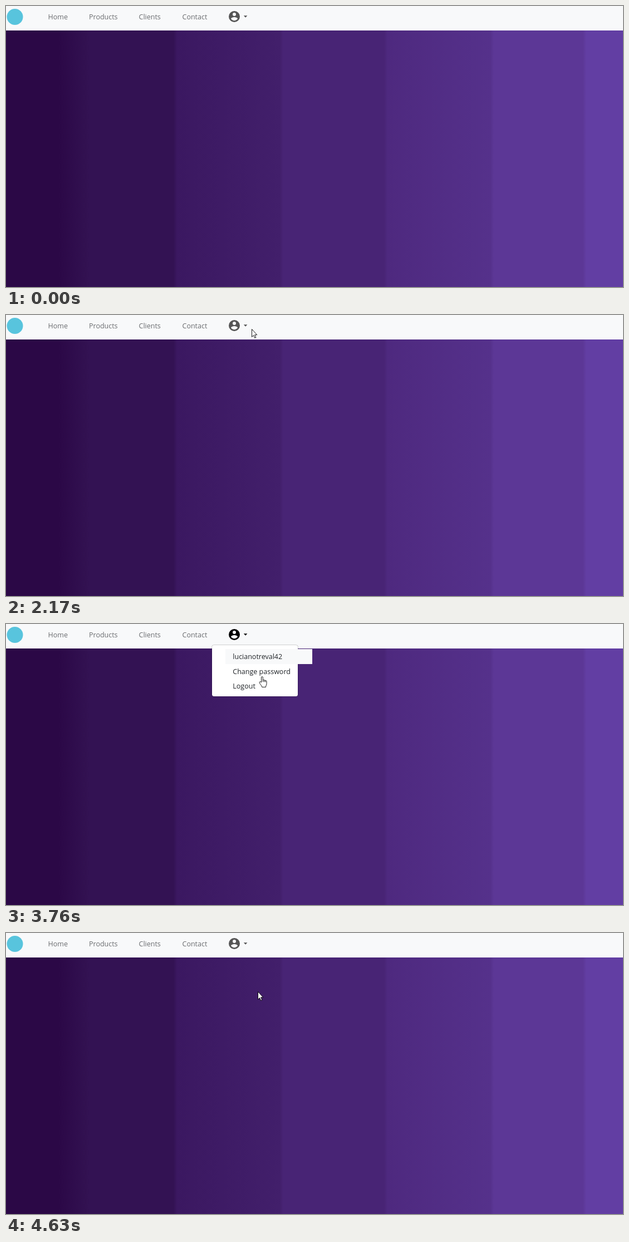
Recreate the animation shown at these times as an HTML page. Size 1108x505 px, loop 8000 ms.

```html
<!DOCTYPE html>
<html lang="en">
<head>
<meta charset="utf-8">
<title>Account menu</title>
<style>
  html, body { margin: 0; width: 100%; height: 100%; overflow: hidden; }
  svg { display: block; width: 100vw; height: 100vh; }
  text { font: 12.5px "Open Sans", "Noto Sans", sans-serif; }
  .nav { fill: #6a6c6f; }
  .item { fill: #212529; }
  .pointer { fill: #fff; stroke: #000; stroke-width: .9; stroke-linejoin: round; }
</style>
</head>
<body>
<svg viewBox="0 0 1108 505">
  <defs>
    <linearGradient id="bands" gradientUnits="userSpaceOnUse" x1="0" x2="1108"></linearGradient>
  </defs>
  <rect width="1108" height="505" fill="url(#bands)"/>
  <rect width="1108" height="44" fill="#f8f9fa"/>
  <circle cx="16" cy="19.5" r="14.5" fill="#58c4dd"/>
  <g id="links"></g>

  <g id="account">
    <circle cx="410" cy="19" r="10"/>
    <path d="M426.8 17.3h6.6l-3.3 3.4z"/>
    <g fill="#f8f9fa">
      <circle cx="410" cy="15" r="3"/>
      <path d="M410 26.2c-2.5 0-4.7-1.3-6-3.2 0-2 4-3.1 6-3.1s6 1.1 6 3.1c-1.3 1.9-3.5 3.2-6 3.2z"/>
    </g>
  </g>

  <g id="menu">
    <rect x="370" y="38" width="154" height="92" rx="3.5" fill="#fff"/>
    <rect x="369.5" y="37.5" width="155" height="93" rx="4" fill="none" stroke="#000" stroke-opacity=".17"/>
    <rect id="hover" x="394" width="156" height="27" fill="#f8f9fa"/>
    <g id="items"></g>
  </g>

  <g id="cursor" class="pointer">
    <path id="arrow" d="M.5.5V14.4L3.6 11.5 5.7 16.3 7.8 15.4 5.7 10.7H9.8z"/>
    <g id="hand" transform="translate(-5.5)">
      <path d="M4 1.9C4 .2 6.8 .2 6.8 1.9V7C7 6 9 6 9.2 7.3 9.6 6.4 11.2 6.6 11.4 8 12 7.2 13.5 7.7 13.5 9.2V13.5C13.5 15.6 12 16.6 12 19.4H5.2C5.2 17 1.2 14 .7 11.2 .4 9.3 2.6 9 4 11z"/>
      <path d="M6.8 7v3.2M9.2 7.3v2.9M11.4 8v2.4" fill="none"/>
    </g>
  </g>
</svg>
<script>
const LOOP = 8000, WIDTH = 1108, SEAM = 3;
const OVER = 2220, OPEN = 3060, LEAVE = 4560, CLOSE = 4630;
const $ = id => document.getElementById(id);

function add(parent, tag, attrs, text) {
  const el = document.createElementNS("http://www.w3.org/2000/svg", tag);
  for (const key in attrs) el.setAttribute(key, attrs[key]);
  if (text) el.textContent = text;
  parent.append(el);
}

// Each band: left edge, colour at the left, colour at the right if it fades
[
  [0, "#2b0846"], [97, "#2c0948", "#321151"], [147, "#331253"],
  [304, "#3b1861", "#421f6b"], [495, "#482475"],
  [682, "#4e297f", "#55318b"], [873, "#5c3796"], [1039, "#623ea3"]
].forEach(([left, from, to = from], i, bands) => {
  const right = bands[i + 1]?.[0] ?? WIDTH;
  add($("bands"), "stop", { offset: (left + SEAM) / WIDTH, "stop-color": from });
  add($("bands"), "stop", { offset: (right - SEAM) / WIDTH, "stop-color": to });
});

[["Home", 75.5], ["Products", 149], ["Clients", 238.5], ["Contact", 316.5]]
  .forEach(([label, x]) => add($("links"), "text", { x, y: 24, class: "nav" }, label));

const rowY = i => Math.round(45 + 26.6 * i);
["lucianotreval42", "Change password", "Logout"].forEach((label, i) =>
  add($("items"), "text", { x: 407.3, y: rowY(i) + 18, class: "item" }, label));

// The pointer is sampled a few times per glide: n steps, one every gap ms.
// The exponents in ease bend the path and set its acceleration.
const glides = [
  { start: 220, to: [692, 247] },
  { start: 600, n: 4, gap: 70, to: [693, 251] },
  { start: 1160, n: 11, gap: 77, to: [453, 60], ease: [3.17, 4.3] },
  { start: 2000, n: 6, gap: 70, to: [425, 9], ease: [1.22, .54] },
  { start: 2610, n: 3, gap: 105, to: [430, 15] },
  { start: 3470, to: [451, 60] },
  { start: 3640, n: 3, gap: 60, to: [460, 94] },
  { start: 3840, n: 6, gap: 66, to: [452, 105] }
];

function pointerAt(t) {
  let pos = [1046, 468];
  for (const { start, n = 1, gap = 1, to, ease = [1, 1] } of glides) {
    if (t < start) break;
    const p = Math.min(n, 1 + Math.floor((t - start) / gap)) / n;
    pos = pos.map((from, i) => Math.round(from + (to[i] - from) * p ** ease[i]));
  }
  return pos;
}

function accountColor(t) {
  if (t < OVER || t >= CLOSE) return "#555";
  if (t >= OPEN) return "#000";
  const step = Math.min(2, Math.floor((t - OVER) / 65));
  const level = 85 - 19 * step;
  return `rgb(${level},${level},${level})`;
}

const show = (id, on) => $(id).setAttribute("display", on ? "inline" : "none");

function draw(t) {
  const [x, y] = pointerAt(t);
  const pointing = t >= OVER && t < LEAVE;
  show("cursor", t >= 70);
  show("hand", pointing);
  show("arrow", !pointing);
  $("cursor").setAttribute("transform", `translate(${x} ${y})`);

  $("account").setAttribute("fill", accountColor(t));
  show("menu", t >= OPEN && t < CLOSE);

  // The highlight trails the pointer by one repaint.
  const row = Math.min(2, Math.floor((t - 3640) / 135));
  show("hover", row >= 0 && t < CLOSE);
  $("hover").setAttribute("y", rowY(row));
}

const start = performance.now();
function tick() {
  draw((performance.now() - start) % LOOP);
  requestAnimationFrame(tick);
}
tick();
</script>
</body>
</html>
```
